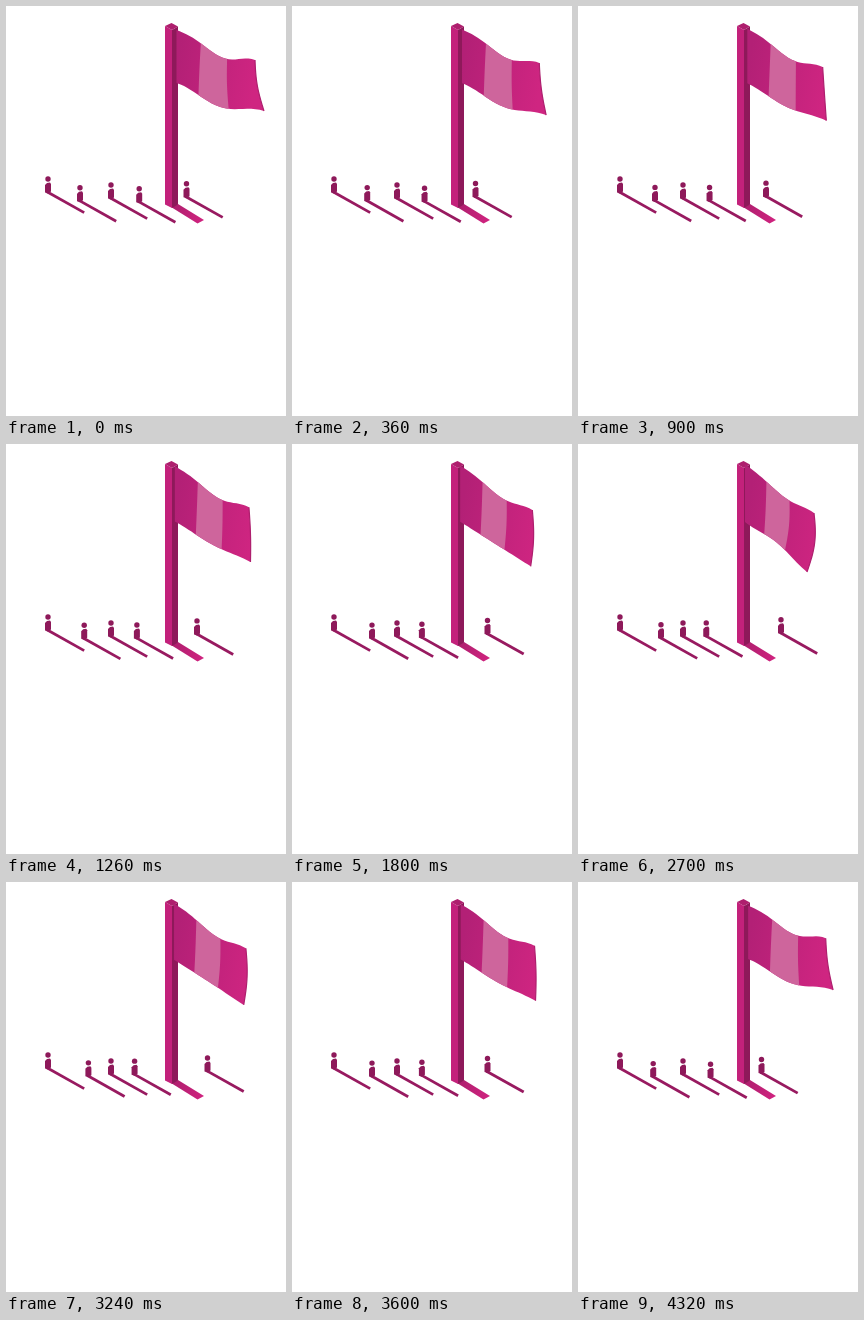
An HTML page with a canvas for the animation above (4500 ms loop, 280 by 410 pixels).

```html
<!DOCTYPE html>
<html lang="en">
<head>
<meta charset="utf-8">
<title>Flag</title>
<style>
  html, body { margin: 0; width: 100%; height: 100%; overflow: hidden; background: #fff; }
  canvas { display: block; }
</style>
</head>
<body>
<canvas id="stage" width="280" height="410"></canvas>
<script>
const ctx = document.getElementById('stage').getContext('2d');
const LOOP = 4500, STEP = 180;
const DARK = '#8e195a', MID = '#ae1f6e', PINK = '#c3217b';

// Head position, then total drift of each figure.
const PEOPLE = [
  [42, 173, 0, 0],
  [74, 181.7, 10, -1],
  [105, 179, 0, 0],
  [133.2, 182.7, -5.5, -4.2],
  [180.5, 177.8, 25, -2.2]
];

const mix = (a, b, k) => a + (b - a) * k;
const hump = s => Math.sin(Math.PI * s) ** 2;
// Linear there and back, turning at the given time.
const swing = (t, turn) => t < turn ? t / turn : (LOOP - t) / (LOOP - turn);

function polygon(color, points) {
  ctx.fillStyle = color;
  ctx.beginPath();
  points.forEach(p => ctx.lineTo(...p));
  ctx.fill();
}

function shade(x0, y0, x1, y1, from, to) {
  const g = ctx.createLinearGradient(x0, y0, x1, y1);
  g.addColorStop(0, from);
  g.addColorStop(1, to);
  return g;
}

function drawPole() {
  polygon(shade(166, 200, 197, 216, MID, '#d0237f'),
    [[165, 201], [172, 198], [198, 214], [191.5, 217.5]]);
  polygon(PINK, [[159, 20], [166, 24], [166, 202], [159, 198.5]]);
  polygon(DARK, [[166, 24], [172, 20.5], [172, 198.5], [166, 202]]);
  polygon(MID, [[159, 20], [165.5, 17], [172, 20.5], [166, 24]]);
}

// Point on the cloth: u runs from pole to free edge, v from top to bottom, k is slackness.
function cloth(u, v, k) {
  const left = mix(170.5, 167, k);
  const sag = 2.3 * Math.sin(Math.PI * k) * u;
  const w = u ** mix(1.18, 1, k);
  const topX = mix(left, mix(249, 236, k), u);
  const topY = mix(mix(24, 20.5, k), mix(54, 69, k), u) + mix(10, 5, k) * hump(u ** 1.3);
  const bottomX = mix(left, mix(258, 229, k), w);
  const bottomY = mix(mix(77, 78, k), mix(105, 128, k), w) + mix(10, -5, k) * hump(w);
  const bow = mix(-2.2, 4.2, k) * u * u * Math.sin(Math.PI * v);
  return [mix(topX, bottomX, v) + bow, mix(topY, bottomY, v) + sag];
}

function drawFlag(k) {
  const steps = Array.from({ length: 25 }, (_, i) => i / 24);
  const stripe = (color, from, to) => polygon(color, [
    ...steps.map(s => cloth(mix(from, to, s), 0, k)),
    ...steps.map(s => cloth(to, s, k)),
    ...steps.map(s => cloth(mix(to, from, s), 1, k)),
    ...steps.map(s => cloth(from, 1 - s, k))
  ]);
  stripe(shade(170, 60, 250, 75, '#b32076', '#cf2581'), 0, 1);
  stripe('#ce659c', 0.31, 0.645);
  ctx.strokeStyle = MID;
  ctx.lineWidth = 1.2;
  ctx.beginPath();
  steps.forEach(s => ctx.lineTo(...cloth(1, s, k)));
  ctx.stroke();
}

function drawPerson([x, y, dx, dy], k) {
  ctx.save();
  ctx.translate(x + dx * k, y + dy * k);
  ctx.strokeStyle = '#981a60';
  ctx.lineWidth = 2.8;
  ctx.beginPath();
  ctx.moveTo(-1, 12.7);
  ctx.lineTo(36.2, 33.6);
  ctx.stroke();
  polygon(DARK, [[-3, 6], [-1, 4], [2, 3.5], [3, 5], [3, 12.5], [0, 14.5], [-3, 13.5]]);
  ctx.beginPath();
  ctx.arc(0, 0, 2.7, 0, Math.PI * 2);
  ctx.fill();
  ctx.restore();
}

function draw(now) {
  const t = Math.floor(now % LOOP / STEP) * STEP;
  ctx.clearRect(0, 0, 280, 410);
  drawPole();
  drawFlag(swing(t, 2700));
  PEOPLE.forEach(p => drawPerson(p, swing(t, 3000)));
  requestAnimationFrame(draw);
}
draw(0);
</script>
</body>
</html>
```
